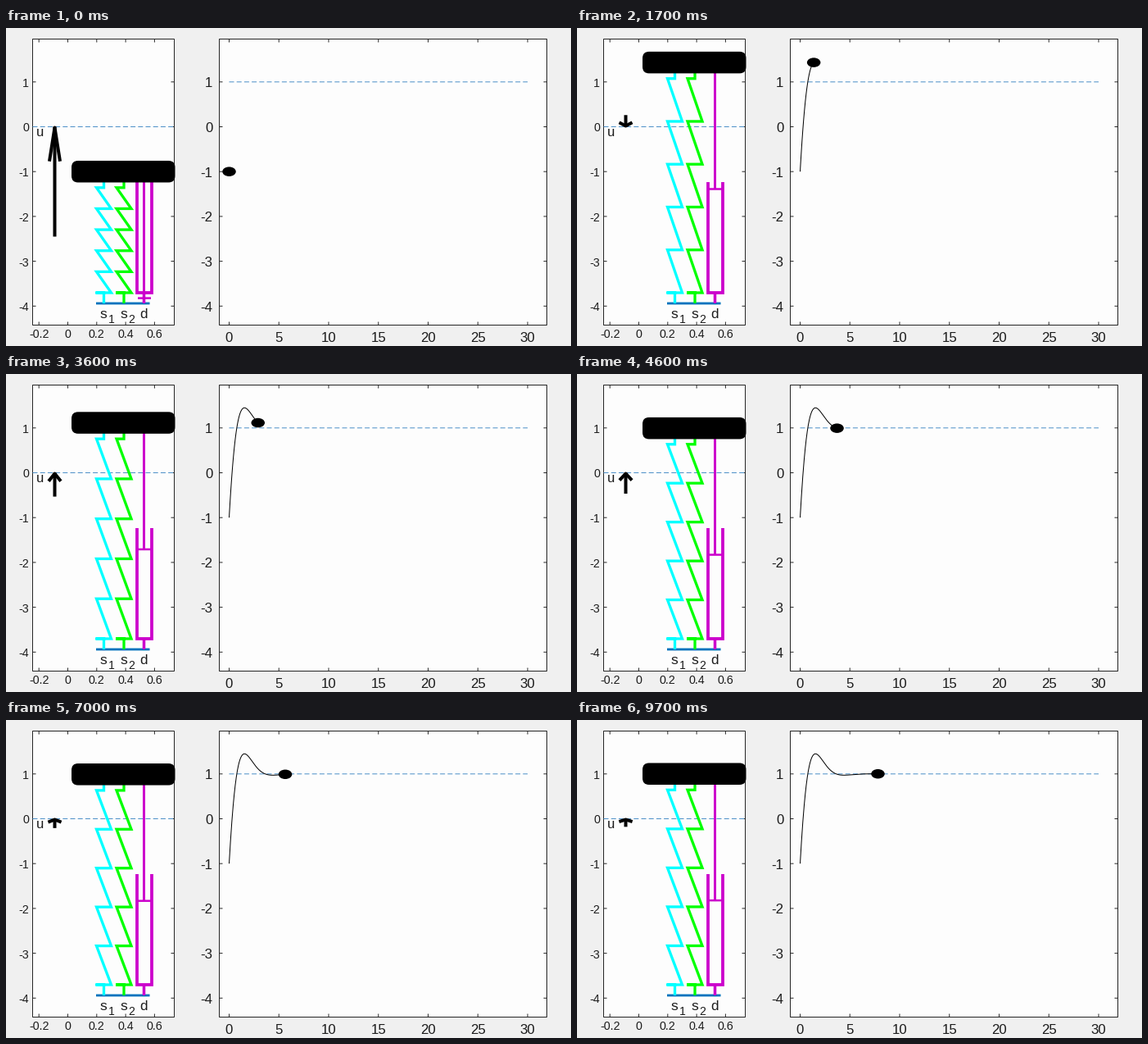
Animation of 690 by 388 pixels, one loop 9800 ms. Source, as a matplotlib script:

```python
import numpy as np
import matplotlib.pyplot as plt
from matplotlib.animation import FuncAnimation
from matplotlib.patches import Ellipse, FancyBboxPatch, Rectangle

plt.rcParams["path.snap"] = False    # keep sub-pixel positions

W, H, DPI = 690, 388, 100
FRAMES, INTERVAL = 98, 100
DT = 0.0806              # simulated seconds per frame
PT = 72 / DPI            # points per pixel

INK = "#262626"
BLUE = "#0072bd"
DASH = "#4d90c8"
CYAN = "#00ffff"
GREEN = "#00ff00"
MAGENTA = "#cc00cc"

TOP, BOTTOM = 13.5, 362.5
BASE_Y, SEAT_Y = 336, 323
ARROW_X = 59.5
ROD_X = 168.5

fig = plt.figure(figsize=(W / DPI, H / DPI), dpi=DPI, facecolor="#f0f0f0")
ax = fig.add_axes([0, 0, 1, 1])
ax.set_xlim(0, W)
ax.set_ylim(H, 0)
ax.axis("off")


def y_px(y):
    return 120.5 - 54.7 * y


def t_px(t):
    return 272.5 + 12.15 * t


def angle_px(x):
    return 75.5 + 176.5 * x


def line(x, y, color, width, **kw):
    kw.setdefault("solid_capstyle", "butt")
    kw.setdefault("solid_joinstyle", "miter")
    return ax.plot(x, y, color=color, lw=width * PT, **kw)[0]


def label(x, y, text, size, ha="center", va="center"):
    ax.text(x, y, text, fontsize=size * PT, family="Liberation Sans",
            color="#1c1c1c", ha=ha, va=va)


def panel(left, right, ticks, to_px, size, label_x, label_y):
    ax.add_patch(Rectangle((left, TOP), right - left, BOTTOM - TOP,
                           fc="#fdfdfd", ec=INK, lw=PT, zorder=0))
    for v in ticks:
        x = to_px(v)
        line([x, x], [BOTTOM, BOTTOM - 4], INK, 1)
        line([x, x], [TOP, TOP + 4], INK, 1)
        label(x, label_y, f"{v:g}", size)
    for v in range(-4, 2):
        y = y_px(v)
        line([left, left + 4], [y, y], INK, 1)
        line([right - 4, right], [y, y], INK, 1)
        label(label_x, y + 0.5, str(v), size, ha="right", va="center_baseline")


def height(t):
    """Damped response from -1 that settles at 1."""
    s, w, t0 = 0.97, 1.1, 0.77
    return 1 + 2 * np.exp(-s * t) * np.sin(w * (t - t0)) / np.sin(w * t0)


FORCE_T = np.array([0, 0.4, 0.8, 1.2, 2.08, 2.88, 3.6, 4.72, 5.6, 6.56, 8])
FORCE_U = np.array([2.45, 0.55, -0.4, -0.35, 0.33, 0.53, 0.48, 0.28, 0.21,
                    0.18, 0.18])
FORCE_D = np.gradient(FORCE_U, FORCE_T)


def force(t):
    """Cubic Hermite curve through the control force samples."""
    i = min(np.searchsorted(FORCE_T, t, side="right") - 1, len(FORCE_T) - 2)
    h = FORCE_T[i + 1] - FORCE_T[i]
    p = (t - FORCE_T[i]) / h
    q = 1 - p
    return (q * q * (1 + 2 * p) * FORCE_U[i] + p * p * (3 - 2 * p) * FORCE_U[i + 1]
            + h * p * q * (q * FORCE_D[i] - p * FORCE_D[i + 1]))


def spring_points(x, mass_y):
    top = mass_y + 19.6
    left, right = x - 9, x + 9
    levels = np.linspace(top, SEAT_Y, 6)
    pts = [(x, mass_y), (x, top)]
    for a, b in zip(levels[:-1], levels[1:]):
        pts += [(left, a), (right, b)]
    pts += [(left - 1, SEAT_Y), (x, SEAT_Y), (x, BASE_Y)]
    return np.array(pts).T


panel(32.5, 205.5, [-0.2, 0, 0.2, 0.4, 0.6], angle_px, 14.2, 28, 374)
panel(260.5, 660.5, range(0, 31, 5), t_px, 16.8, 252.5, 378.8)

dashes = dict(dashes=(6, 3.2), dash_capstyle="butt")
line([32.5, 205.5], [y_px(0)] * 2, DASH, 1, **dashes)
line([t_px(0), t_px(30)], [y_px(1)] * 2, DASH, 1, **dashes)

# Fixed parts of the suspension
line([110, 175.5], [BASE_Y] * 2, BLUE, 2.8)
line([160, 160, 178, 178], [188, SEAT_Y, SEAT_Y, 188], MAGENTA, 3.8)
line([ROD_X] * 2, [SEAT_Y, BASE_Y], MAGENTA, 3.5)

label(41.5, 132.5, "u", 16.5, va="baseline")
label(119, 353.5, "s", 17.5, va="baseline")
label(129, 360, "1", 14, va="baseline")
label(144, 353.5, "s", 17.5, va="baseline")
label(153.5, 360, "2", 14, va="baseline")
label(168.5, 353.5, "d", 17, va="baseline")

# Moving parts
springs = [(119.5, line([], [], CYAN, 3.3)), (144, line([], [], GREEN, 3.3))]
rod = line([], [], MAGENTA, 3)
piston = line([], [], MAGENTA, 2.5)
stem = line([], [], "black", 4)
head = line([], [], "black", 4, solid_joinstyle="round",
            solid_capstyle="projecting")
trace = line([], [], "black", 1)
block = FancyBboxPatch((80, 0), 126.5, 26.5, fc="black", ec="none", zorder=5,
                       boxstyle="round,pad=0,rounding_size=8")
ball = Ellipse((0, 0), 16.5, 11.5, fc="black", ec="none", zorder=5)
ax.add_patch(block)
ax.add_patch(ball)


def update(frame):
    t = frame * DT
    y = y_px(height(t))

    for x, artist in springs:
        artist.set_data(*spring_points(x, y))
    piston_y = y + 154.4
    rod.set_data([ROD_X] * 2, [y, piston_y])
    piston.set_data([161, 177], [piston_y] * 2)
    block.set_y(y - 13.25)

    tip, u = y_px(0), force(t)
    tail = y_px(-u)
    barb = tip + 0.3 * (tail - tip)
    stem.set_data([ARROW_X] * 2, [tail, tip])
    head.set_data([ARROW_X - 6.2, ARROW_X, ARROW_X + 6.2],
                  [barb, tip + np.sign(u), barb])

    past = np.linspace(0, t, 2 + 3 * frame)
    trace.set_data(t_px(past), y_px(height(past)))
    ball.center = (t_px(t), y)
    return []


anim = FuncAnimation(fig, update, frames=FRAMES, interval=INTERVAL,
                     init_func=lambda: update(0), repeat=True, repeat_delay=0)
plt.show()
```
